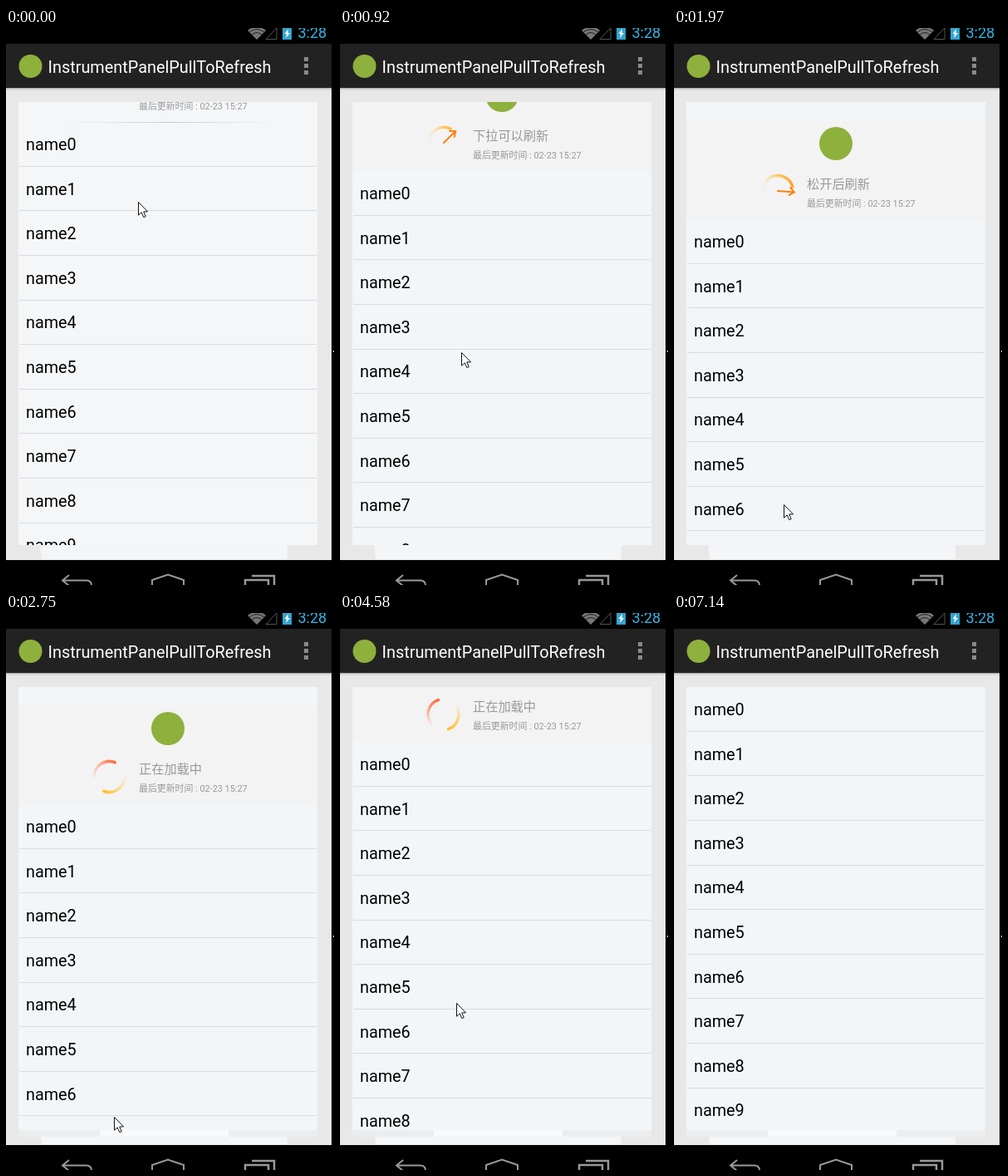
An HTML page that plays this animation: 395 px wide and 670 px high, repeating every 7670 ms.

```html
<!DOCTYPE html>
<html lang="zh-CN">
<head>
<meta charset="utf-8">
<title>InstrumentPanelPullToRefresh</title>
<style>
html, body { margin: 0; width: 100%; height: 100%; overflow: hidden; background: #000; }
svg { display: block; width: 395px; height: 670px; font-family: Roboto, "Noto Sans CJK SC", "Noto Sans CJK", sans-serif; }
</style>
</head>
<body>
<svg viewBox="0 0 395 670">
  <defs>
    <clipPath id="clip"><rect x="15" y="89" width="360" height="533"/></clipPath>
    <linearGradient id="divider">
      <stop stop-color="#ccc" stop-opacity="0"/><stop offset=".5" stop-color="#ccc"/><stop offset="1" stop-color="#ccc" stop-opacity="0"/>
    </linearGradient>
    <linearGradient id="dial" gradientUnits="userSpaceOnUse" x1="-19" y1="0" x2="19" y2="0">
      <stop stop-color="#ffd27a" stop-opacity="0"/><stop offset=".5" stop-color="#ffcb62"/><stop offset="1" stop-color="#ffa02e"/>
    </linearGradient>
    <linearGradient id="red" gradientUnits="userSpaceOnUse" x1="-6.3" y1="-17.4" x2="18.5" y2="0">
      <stop stop-color="#ff7a45" stop-opacity=".08"/><stop offset="1" stop-color="#ff6a38"/>
    </linearGradient>
    <linearGradient id="yellow" gradientUnits="userSpaceOnUse" x1="-6.3" y1="-17.4" x2="18.5" y2="0">
      <stop stop-color="#ffc83c" stop-opacity=".08"/><stop offset="1" stop-color="#ffbe28"/>
    </linearGradient>
  </defs>

  <rect y="72" width="392" height="568" fill="#e8e8e8"/>
  <rect y="19" width="392" height="53" fill="#222"/>
  <rect y="72" width="392" height="1" fill="#aaa"/>
  <rect y="73" width="392" height="2" fill="#d9d9d9"/>
  <rect x="394" y="388" width="1" height="2" fill="#ddd"/>

  <g id="status">
    <path d="M291 3Q302 -6 313 3L302 14Z" fill="#777"/>
    <path d="M293 5Q302 -2 311 5M296 8Q302 3 308 8" fill="none" stroke="#222"/>
    <path d="M313 13.5H326V0Z" fill="none" stroke="#555"/>
    <path d="M333 0H344V14H333Z" fill="#33a5d0"/>
    <path d="M340 1L335.5 7H338L337 12L342 6H339.3Z" fill="#fff"/>
    <text x="351.5" y="12" font-size="18" fill="#33b5e5">3:28</text>
  </g>
  <circle cx="29.5" cy="46" r="14" fill="#8eb03c"/>
  <text x="50.6" y="53.5" font-size="19.85" fill="#fff">InstrumentPanelPullToRefresh</text>
  <path d="M359 35h5v5h-5zM359 43h5v5h-5zM359 51h5v5h-5z" fill="#8a8a8a"/>

  <path d="M41 622H339V639H43Z" fill="#f4f5f7"/>
  <g id="residue">
    <rect x="15" y="622" width="360" height="8" fill="#ecedee"/>
    <rect x="113" y="622" width="155" height="8" fill="#f8f9fa"/>
  </g>

  <g clip-path="url(#clip)">
    <rect id="panel" x="15" y="89" width="360" height="533"/>
    <g id="list">
      <rect id="headBg" x="15" y="-118" width="360" height="118" fill="#f3f3f3"/>
      <circle cx="195" cy="-91" r="20" fill="#8eb03c"/>
      <g fill="#999">
        <text id="hint" x="160" y="-37.5" font-size="15.2"></text>
        <text x="160" y="-15" font-size="10.9">最后更新时间 : 02-23 15:27</text>
      </g>
      <g id="gauge" transform="translate(125 -34)" fill="none">
        <path id="arc" stroke="url(#dial)" stroke-width="3.5"/>
        <path id="needle" d="M0 0H20M15 -5L20 0L14 4" stroke="#ff8010" stroke-width="2" stroke-linecap="round"/>
      </g>
      <g id="spinner" fill="none" stroke-width="3.5" stroke-linecap="round">
        <path d="M-6.3 -17.4A18.5 18.5 0 0 1 18.5 0" stroke="url(#red)"/>
        <path d="M-6.3 -17.4A18.5 18.5 0 0 1 18.5 0" stroke="url(#yellow)" transform="rotate(180)"/>
      </g>
      <rect id="rule" x="70" width="255" height="1" fill="url(#divider)"/>
      <g id="rows" font-size="19.8"></g>
    </g>
  </g>

  <g fill="none" stroke="#999" stroke-width="2">
    <path d="M76 658L68 664.5L76 671M68 664.5H97Q103 664.5 103 671"/>
    <path d="M176 671V664L195 657.5L214 664V671"/>
    <path d="M288 671V664H316V671M296 659H323V671" stroke-width="2.5"/>
  </g>
  <path id="cursor" d="M.5 .5V16.2L4.2 12.8L6.8 18.6L9.2 17.6L6.7 11.9H11.5Z" fill="#fff" stroke="#111"/>
</svg>

<script>
const LOOP = 7670, RELEASE = 2720, DONE = 5470, SNAP = 400, REST = 66;
const $ = id => document.getElementById(id);
const clamp = (v, lo, hi) => Math.min(hi, Math.max(lo, v));
const show = (id, on) => $(id).setAttribute('display', on ? 'inline' : 'none');
const ease = x => 1 - (1 - clamp(x, 0, 1)) ** 2;

// Linear path through [time, ...values] points
function track(points, t) {
  const i = points.findIndex(p => p[0] > t);
  if (i < 0) return points[points.length - 1].slice(1);
  if (i === 0) return points[0].slice(1);
  const a = points[i - 1], b = points[i], k = (t - a[0]) / (b[0] - a[0]);
  return a.slice(1).map((v, j) => v + (b[j + 1] - v) * k);
}

const PULL = [[30, 24], [500, 64], [1350, 102], [1970, 141], [2440, 154]];
const MOUSE = [
  [30, 159, 209], [500, 151, 324], [1350, 140, 457], [1970, 132, 573], [2440, 129, 612],
  [2720, 129, 612], [3200, 150, 520], [3460, 160, 473], [3550, 140, 470],
  [4300, 140, 470], [4580, 140, 469], [6360, 140, 469], [6430, 133, 473], [7140, 366, 668]
];

function offset(t) {
  if (t < RELEASE) return track(PULL, t)[0];
  if (t < DONE) return 154 + (REST - 154) * ease((t - RELEASE) / SNAP);
  return REST * (1 - ease((t - DONE) / SNAP));
}

$('rows').innerHTML = Array.from({length: 10}, (_, i) => {
  const y = 53.6 * i;
  return `<text x="24" y="${Math.round(34 + y)}">name${i}</text>` +
    `<rect x="16" y="${Math.round(52.8 + y)}" width="358" height="1" fill="#d8dcdf"/>`;
}).join('');

function draw(t) {
  const pull = Math.round(offset(t)), loading = t >= RELEASE, idle = t < 30;
  const sweep = clamp((pull - 42) * 3.3, 0, 184);
  const end = (sweep - 195) * Math.PI / 180; // the trail stops short of the needle

  $('list').setAttribute('transform', `translate(0 ${89 + pull})`);
  $('panel').setAttribute('fill', idle ? '#f5f6f8' : '#f2f6f9');
  show('headBg', !idle);
  show('rule', idle);
  show('residue', loading);
  $('hint').textContent = loading ? '正在加载中' : sweep < 180 ? '下拉可以刷新' : '松开后刷新';

  show('gauge', !loading);
  show('arc', sweep > 15);
  show('spinner', loading);
  $('arc').setAttribute('d', `M-18.5 0A18.5 18.5 0 0 1 ${18.5 * Math.cos(end)} ${18.5 * Math.sin(end)}`);
  $('needle').setAttribute('transform', `rotate(${sweep - 180})`);
  $('spinner').setAttribute('transform', `translate(124.5 -33) rotate(${25 + (t - 3550) * .568})`);

  const [x, y] = track(MOUSE, t).map(Math.round);
  $('cursor').setAttribute('transform', `translate(${x} ${y})`);
  show('cursor', t < 7140);
}

const start = performance.now();
function tick() {
  draw((performance.now() - start) % LOOP);
  requestAnimationFrame(tick);
}
tick();
</script>
</body>
</html>
```
